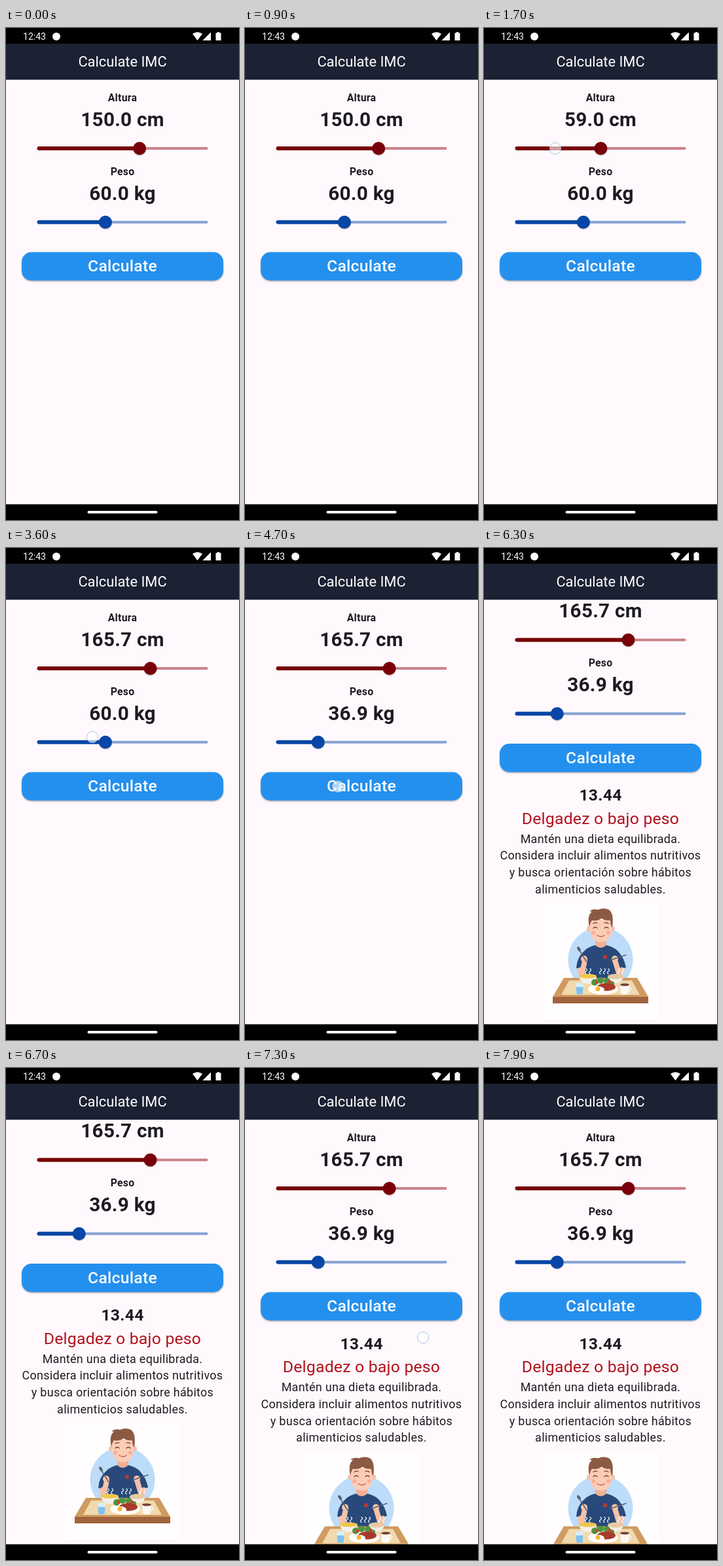
An HTML page that plays this animation: 356x752 px, repeating every 8 s.

```html
<!DOCTYPE html>
<html lang="es">
<head>
<meta charset="utf-8">
<title>Calculate IMC</title>
<style>
  html, body { margin: 0; height: 100%; overflow: hidden; background: #000; }
  svg { display: block; width: 100vw; height: 100vh; }
  text { font-family: Roboto, "Open Sans", sans-serif; text-anchor: middle; letter-spacing: .25px; fill: #1d1b20; }
  .label { font-size: 15.8px; font-weight: 700; }
  .value { font-size: 29.7px; font-weight: 700; }
  .body { font-size: 17.9px; letter-spacing: .32px; }
  .bar { fill: #fff; letter-spacing: 0; }
  .line { fill: none; stroke-linecap: round; stroke-linejoin: round; }
</style>
</head>
<body>
<svg viewBox="0 0 356 752">
  <defs>
    <clipPath id="page"><rect y="79" width="356" height="649"/></clipPath>
    <clipPath id="btn"><rect x="24" y="342.5" width="308" height="43.5" rx="15"/></clipPath>
    <filter id="soft" x="-5%" y="-20%" width="110%" height="150%"><feGaussianBlur stdDeviation="1"/></filter>
  </defs>
  <rect width="356" height="752" fill="#fff9fd"/>

  <g clip-path="url(#page)">
    <g id="content">
      <text class="label" x="178" y="112">Altura</text>
      <text class="value" x="178" y="149.8" id="cm"></text>
      <g id="height"></g>
      <text class="label" x="178" y="224.8">Peso</text>
      <text class="value" x="178" y="262.6" id="kg"></text>
      <g id="weight"></g>

      <rect x="24" y="344" width="308" height="43.5" rx="15" fill="#000" opacity=".3" filter="url(#soft)"/>
      <rect x="24" y="342.5" width="308" height="43.5" rx="15" fill="#2490ee"/>
      <circle id="ripple" cx="142" cy="364" fill="#fff" clip-path="url(#btn)"/>
      <text x="178" y="372.3" font-size="24.7" font-weight="500" style="fill:#fff">Calculate</text>

      <g id="result">
        <text x="178" y="429.8" font-size="24.7" font-weight="700">13.44</text>
        <text x="178" y="465.4" font-size="24.7" style="fill:#b0121b">Delgadez o bajo peso</text>
        <text class="body" x="178" y="494.2">Mantén una dieta equilibrada.</text>
        <text class="body" x="178" y="519.9">Considera incluir alimentos nutritivos</text>
        <text class="body" x="178" y="545.6">y busca orientación sobre hábitos</text>
        <text class="body" x="178" y="571.3">alimenticios saludables.</text>

        <g transform="translate(0 43.5)">
          <rect x="90" y="544" width="176" height="176" fill="#fffdfe"/>
          <circle cx="178" cy="629" r="49.5" fill="#bddcf9"/>
          <!-- man -->
          <path d="M170 592h17v16q-8 8-17 0z" fill="#eeb096"/>
          <path d="M151 658l-1-36q2-10 20-15q8 8 17 0q18 5 21 15l-2 36z" fill="#28497a"/>
          <path d="M152 617q-10 9-11 25l13 3 6-18z" fill="#28497a"/>
          <path d="M205 617q9 9 12 24l-13 5-7-18z" fill="#28497a"/>
          <g class="line" stroke="#f6c1a8" stroke-width="8">
            <path d="M147 645l2 8 5-22"/>
            <path d="M211 645l-4 8-7-23"/>
          </g>
          <circle cx="153" cy="628" r="5" fill="#f6c1a8"/>
          <circle cx="200" cy="628" r="5" fill="#f6c1a8"/>
          <g class="line" stroke="#59616f" stroke-width="1.5">
            <path d="M157 633l-13-21"/>
            <path d="M193 630l24-8"/>
          </g>
          <ellipse cx="145" cy="613" rx="2.2" ry="4" fill="#59616f" transform="rotate(-30 145 613)"/>
          <circle cx="185" cy="625" r="3.2" fill="#b23a35"/>
          <circle cx="161" cy="582" r="4" fill="#f6c1a8"/>
          <circle cx="196" cy="582" r="4" fill="#f6c1a8"/>
          <path d="M162 568h33v17q-2 17-16.500 17.500q-14.500-.5-16.500-17.500z" fill="#fccdb5"/>
          <path d="M161 580q-4-19 4-24q-3-1-4-1q6-4 13-2q9-4 17 0q8 6 5 27q-3-3-3-11q-8 1-13-3q-8 5-15 3q-3 4-4 11z" fill="#8c5a43"/>
          <g class="line" stroke="#6b3c2f" stroke-width="1.300">
            <path d="M167 581q3-3 6 0M184 581q3-3 6 0M167 574q3-2 6-1M184 573q3-1 6 1"/>
            <path d="M173 592q6 4 11 0" stroke="#b85a50"/>
          </g>
          <circle cx="167" cy="588" r="3" fill="#f5a18f" opacity=".7"/>
          <circle cx="190" cy="588" r="3" fill="#f5a18f" opacity=".7"/>
          <!-- table -->
          <path d="M122 657h112l17 29h-146z" fill="#cf9b60"/>
          <path d="M105 686h146v10h-146z" fill="#a2643e"/>
          <path d="M130 661h96l12 22h-120z" fill="#f1d9ae"/>
          <path d="M145 654h27q-1 12-13 12t-14-12z" fill="#f4f0ea"/>
          <ellipse cx="158.500" cy="654.500" rx="13.500" ry="3.500" fill="#f3c64b"/>
          <path d="M189 655h24q-2 10-12 10t-12-10z" fill="#f4f0ea"/>
          <ellipse cx="201" cy="655" rx="12" ry="4" fill="#e9c9a3"/>
          <ellipse cx="182" cy="674" rx="23" ry="9" fill="#fffaf5"/>
          <g fill="#4f9440">
            <circle cx="169" cy="664" r="5"/><circle cx="178" cy="661" r="5"/>
            <circle cx="188" cy="662" r="5"/><circle cx="195" cy="666" r="4"/>
          </g>
          <ellipse cx="187" cy="671" rx="14" ry="6" fill="#a73a2d"/>
          <circle cx="172" cy="664" r="2.500" fill="#d93b30"/>
          <circle cx="192" cy="663" r="2.500" fill="#d93b30"/>
          <ellipse cx="174" cy="675" rx="10" ry="5" fill="#fff"/>
          <circle cx="174" cy="674" r="3.500" fill="#f6b52d"/>
          <path d="M140 665h12l-1.500 17h-9z" fill="#d9effc"/>
          <path d="M140.500 671h11l-1 11h-9z" fill="#7dc1ee"/>
          <path d="M208 667h14l-1 14q-6 3-12 0z" fill="#fbf8f5"/>
          <ellipse cx="215" cy="667.500" rx="7" ry="2" fill="#754634"/>
          <path class="line" d="M222 671q5 1 0 6" stroke="#fbf8f5" stroke-width="1.500"/>
          <path class="line" id="steam" stroke="#fff" stroke-width="1.200"/>
        </g>
      </g>
    </g>
  </g>

  <rect width="356" height="24"/>
  <rect y="24" width="356" height="55" fill="#1c2233"/>
  <text class="bar" x="178" y="58.800" font-size="21.8">Calculate IMC</text>
  <text class="bar" x="43.500" y="18" font-size="14">12:43</text>
  <g fill="#fff">
    <circle cx="77" cy="13" r="6"/>
    <path d="M285 9q7.500-5.500 15 0l-7.500 10z"/>
    <path d="M313 6.500v12.500h-12.500z"/>
    <path d="M323 6h3v1.500h2.500v11.500h-8v-11.500h2.500z"/>
  </g>
  <rect y="728" width="356" height="24"/>
  <rect x="124.500" y="738" width="107" height="4" rx="2" fill="#fff"/>
  <circle id="touch" r="8.700" fill="#fff" fill-opacity=".62" stroke="#9cb9e2" stroke-opacity=".85"/>
</svg>
<script>
const $ = id => document.getElementById(id);
const LOOP = 8000, LEFT = 47.5, WIDTH = 261;
const clamp = v => Math.max(0, Math.min(1, v));

// Value at t of a list of [time, value] keys, smoothed between keys
function at(t, keys) {
  let i = keys.length - 1;
  while (i > 0 && keys[i][0] > t) i--;
  const [t0, v0] = keys[i], next = keys[i + 1];
  if (!next || t < t0) return v0;
  const u = (t - t0) / (next[0] - t0);
  return v0 + (next[1] - v0) * u * u * (3 - 2 * u);
}

function slider(id, y, color, pale, max) {
  $(id).innerHTML = `
    <rect x="${LEFT}" y="${y - 2}" width="${WIDTH}" height="4" rx="2" fill="${pale}"/>
    <rect x="${LEFT}" y="${y - 3}" height="6" rx="3" fill="${color}"/>
    <circle cy="${y}" fill="${color}" opacity=".12"/>
    <circle cy="${y + 1}" r="10.300" opacity=".22"/>
    <circle cy="${y}" r="10" fill="${color}"/>`;
  const [, active, halo, shade, thumb] = $(id).children;
  return (value, press) => {
    const x = value / max * WIDTH;
    active.setAttribute('width', x);
    for (const c of [halo, shade, thumb]) c.setAttribute('cx', LEFT + x);
    halo.setAttribute('r', 20 * press);
  };
}
const setHeight = slider('height', 184, '#780008', '#ca8388', 250);
const setWeight = slider('weight', 296.8, '#0746a6', '#86a3d4', 150);

$('steam').setAttribute('d', [156, 162, 178, 184, 190, 206, 212]
  .map(x => `M${x} 651q-3-2 0-4t0-4`).join(''));

const cmKeys = [[0, 150], [1660, 150], [1660, 59], [1800, 59], [2500, 165.7]];
const cmThumb = [[0, 150], [1660, 150], [1780, 59], [1800, 59], [2500, 165.7]];
const kgKeys = [[0, 60], [3620, 60], [3620, 48.6], [3720, 48.6], [4250, 36.9]];
const kgThumb = [[0, 60], [3620, 60], [3720, 48.6], [4250, 36.9]];
const scrollKeys = [[0, 0], [5920, 0], [6000, 43.5], [7000, 43.5], [7300, 0]];

// Finger contacts: start, end, x keys, y keys
const touches = [
  [1650, 2650, [[1800, 109], [2500, 220.7]], [[1800, 184], [2500, 188]]],
  [3560, 4320, [[3720, 132], [4250, 111.7]], [[0, 289]]],
  [4660, 4790, [[0, 142]], [[0, 364.5]]],
  [5920, 6250, [[0, 273.5]], [[5920, 425], [6000, 363], [6200, 335]]],
  [6950, 7380, [[0, 272]], [[7000, 350], [7300, 412]]]
];

const pressed = (t, from, to) => clamp((t - from) / 120) * clamp((to - t) / 120);

function draw(t) {
  $('cm').textContent = at(t, cmKeys).toFixed(1) + ' cm';
  $('kg').textContent = at(t, kgKeys).toFixed(1) + ' kg';
  setHeight(at(t, cmThumb), pressed(t, 1660, 2750));
  setWeight(at(t, kgThumb), pressed(t, 3620, 4350));

  $('content').setAttribute('transform', `translate(0 ${-at(t, scrollKeys)})`);
  $('result').style.display = t >= 4800 ? '' : 'none';

  const wave = clamp((t - 4710) / 330);
  $('ripple').setAttribute('r', 200 * wave);
  $('ripple').setAttribute('opacity', wave && .12 * (1 - wave));

  const finger = touches.find(([from, to]) => t >= from && t < to);
  $('touch').style.display = finger ? '' : 'none';
  if (finger) {
    $('touch').setAttribute('cx', at(t, finger[2]));
    $('touch').setAttribute('cy', at(t, finger[3]));
  }
}

function tick() {
  draw(performance.now() % LOOP);
  requestAnimationFrame(tick);
}
tick();
</script>
</body>
</html>
```
